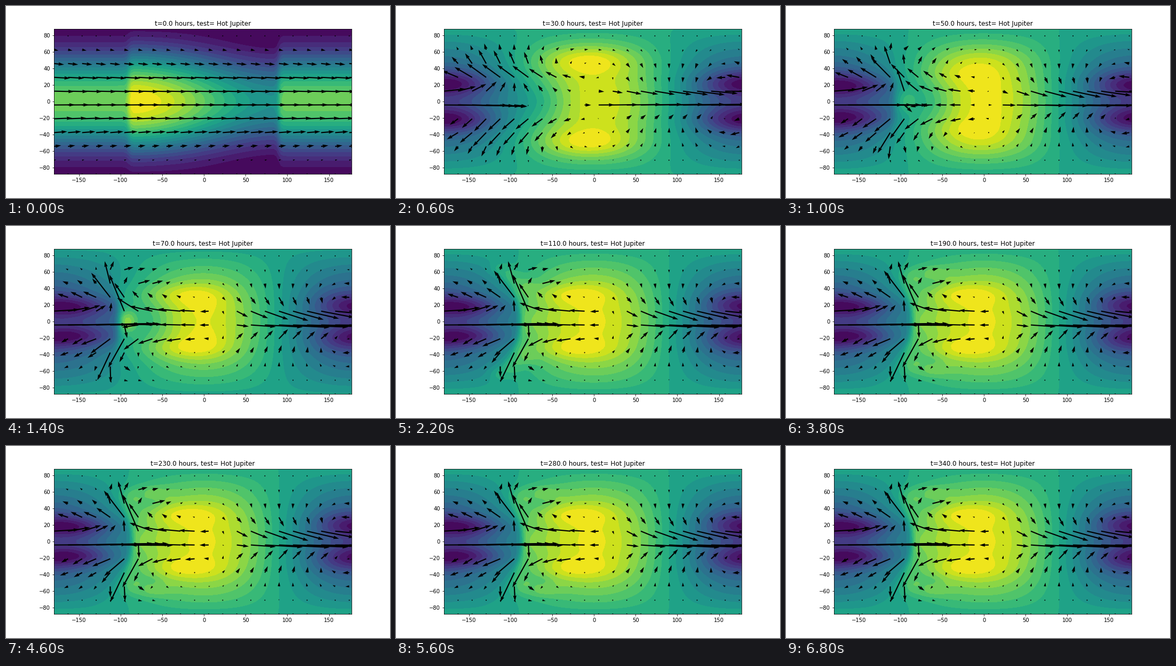
Animation of 720 by 360 pixels, one loop 7000 ms. Source, as a matplotlib script:

```python
import matplotlib.pyplot as plt
import numpy as np
from matplotlib.animation import FuncAnimation

FRAMES, INTERVAL, HOURS_PER_FRAME = 35, 200, 10
STRIDE = 6

# Gaussian grid of the spectral model
lon = -180 + 360 / 128 * np.arange(128)
lat = np.degrees(np.arcsin(np.polynomial.legendre.leggauss(64)[0]))
LON, LAT = np.meshgrid(lon, lat)
COS_LAT = np.cos(np.radians(LAT))
QLON, QLAT = np.meshgrid(lon[::STRIDE], lat[::STRIDE])
NORTH = np.sign(QLAT)


def wrap(angle):
    return (angle + 180) % 360 - 180


def gauss(x, width):
    return np.exp(-0.5 * (x / width) ** 2)


def pulse(t, peak):
    return max(0, 1 - abs(t - peak) / 40)


def settle(t, start):
    return min(max((t - start) / 40, 0), 1)


def bump(x, y, wx, wy, amp):
    """Bump mirrored across the equator."""
    across = gauss(LAT - y, wy) + (gauss(LAT + y, wy) if y else 0)
    return amp * gauss(wrap(LON - x), wx) * across


# passing features
waves = (bump(-175, 22, 38, 11, -.28) + bump(-10, 50, 40, 12, .17)
         + bump(-65, 0, 30, 18, -.13))
shock = (bump(0, 22, 25, 15, .08) + bump(-92, 0, 7, 9, .2)
         + bump(-62, 0, 15, 14, -.08))
tongue = (bump(-82, 42, 9, 7, .1) + bump(-98, 54, 9, 7, .1)
          + bump(-114, 63, 9, 6, .08))
ridge = bump(-86, 50, 9, 9, .13)
# lasting features
lobes = (bump(-155, 18, 32, 9, -.25) + bump(165, 24, 25, 11, -.1)
         + bump(-28, 33, 32, 9, .12))
notch = bump(-86, 50, 9, 9, .07) + bump(-62, 50, 9, 6, -.06)
curl = bump(-68, 57, 18, 7, .13) + bump(-76, 57, 6, 4, -.05)


def start_height():
    day = (np.tanh((LON + 90) / 3) - np.tanh((LON - 90) / 3)) / 2
    heating = -.255 * np.sin(np.radians(LON)) - .025
    return .77 * COS_LAT ** 2 + day * heating * COS_LAT


def flow_height(t):
    s = settle(t, 30)
    h = .60 - .04 * s
    h = h + (.35 + .03 * s) * np.cos(np.radians(LON)) * COS_LAT

    # steep front at the morning terminator
    edge = np.interp(t, [30, 70, 110, 150], [-112, -102, -88, -86])
    bend = 4 + 11 * settle(t, 70)
    d = wrap(LON - edge + bend * (LAT / 45) ** 2)
    h += .2 * s * np.tanh(d / 5) * np.exp(-np.abs(d) / 25 - (LAT / 38) ** 2)

    h += waves * pulse(t, 30) + shock * pulse(t, 70)
    h += tongue * pulse(t, 110) + ridge * pulse(t, 150)
    return h + lobes * s + notch * settle(t, 110) + curl * settle(t, 150)


def height(t):
    s = min(t / 30, 1)
    h = (1 - s) * start_height() + s * flow_height(max(t, 30))
    return (h - h.min()) / np.ptp(h)


# Wind in pixels: profiles along longitude, each weighted by latitude
BELTS = [4.2, 12.6, 20.9, 29.3, 46, 62.8, 77]
EARLY_LON = [-180, -129, -79, -28, 40, 128]
LATE_LON = [-180, -146, -112, -96, -79, -62, -28, 6, 39, 90, 141]


def belt(weights):
    return np.interp(np.abs(QLAT), BELTS, weights)


def early_wind():
    def along(values):
        return np.interp(QLON, EARLY_LON, values, period=360)

    u = belt([1, .4, .08, 0, 0, 0, 0]) * along([120, 75, -1, -5, 65, 134])
    u += belt([0, .3, .8, 1, .4, .1, 0]) * along([-27, -36, -30, -16, 6, -3])
    u += belt([0, 0, 0, 0, 1, 1, 0]) * along([0, 0, 4, 9, 4, -3])
    v = belt([.12, .7, .9, 1, 1, .45, 0]) * along([6, 26, 22, 5, -8, -10])
    return np.array([u, NORTH * v])


def late_wind(t):
    # the front drifts east before it settles
    x = QLON + 16 * (1 - settle(t, 70)) * gauss(QLON + 95, 25)

    def along(values):
        return np.interp(x, LATE_LON, values, period=360)

    def jet(cx, cy, wx, wy, amp):
        return amp * gauss(x - cx, wx) * gauss(np.abs(QLAT) - cy, wy)

    u = belt([1, .4, 0, 0, 0, 0, 0]) * along(
        [137, 132, 108, 93, 2, -40, -38, -17, 22, 95, 120])
    u += belt([0, 1, 1, .5, 0, 0, 0]) * along(
        [-8, -18, -34, -38, -30, -27, -27, -9, 12, 17, 14])
    u += belt([0, 0, 0, .9, .7, .3, 0]) * along(
        [-16, -14, -10, -22, -3, 4, 6, 6, 4, 1, -5])
    u += jet(-80, 60, 22, 8, 20) + jet(-62, 46, 10, 5, 20)
    u += jet(-62, 55, 9, 4, -22)

    v = belt([-.25, 1, 1, .95, .6, .3, 0]) * along(
        [3, 11, 11, 11, 11, 10, 4, -1, -11, -18, -12])
    v += jet(-79, 14, 8, 8, 58) + jet(-96, 35, 9, 10, 45)
    v += jet(-103, 54, 11, 9, 20)
    return np.array([u, NORTH * v])


def wind(t):
    if t <= 30:
        phi = np.radians(QLAT)
        start = np.array([39.5 * np.cos(phi) ** 2, -2 * np.sin(2 * phi)])
        return start + t / 30 * (early_wind() - start)
    s = settle(t, 30)
    return (1 - s) * early_wind() + s * late_wind(t)


fig, ax = plt.subplots(figsize=(10, 5), dpi=72)
fig.subplots_adjust(left=.125, right=.9, bottom=.125, top=.88)


def draw(frame):
    t = frame * HOURS_PER_FRAME
    ax.clear()
    ax.contourf(lon, lat, height(t), levels=np.linspace(0, 1, 21),
                cmap="viridis")
    u, v = wind(t)
    ax.quiver(QLON, QLAT, u, v, scale=1, scale_units="dots")
    ax.set_xlim(lon[0], lon[-1])
    ax.set_ylim(lat[0], lat[-1])
    ax.set_title(f"t={t:.1f} hours, test= Hot Jupiter")
    return []


anim = FuncAnimation(fig, draw, frames=FRAMES, interval=INTERVAL,
                     init_func=lambda: draw(0), repeat=True, repeat_delay=0)
plt.show()
```
